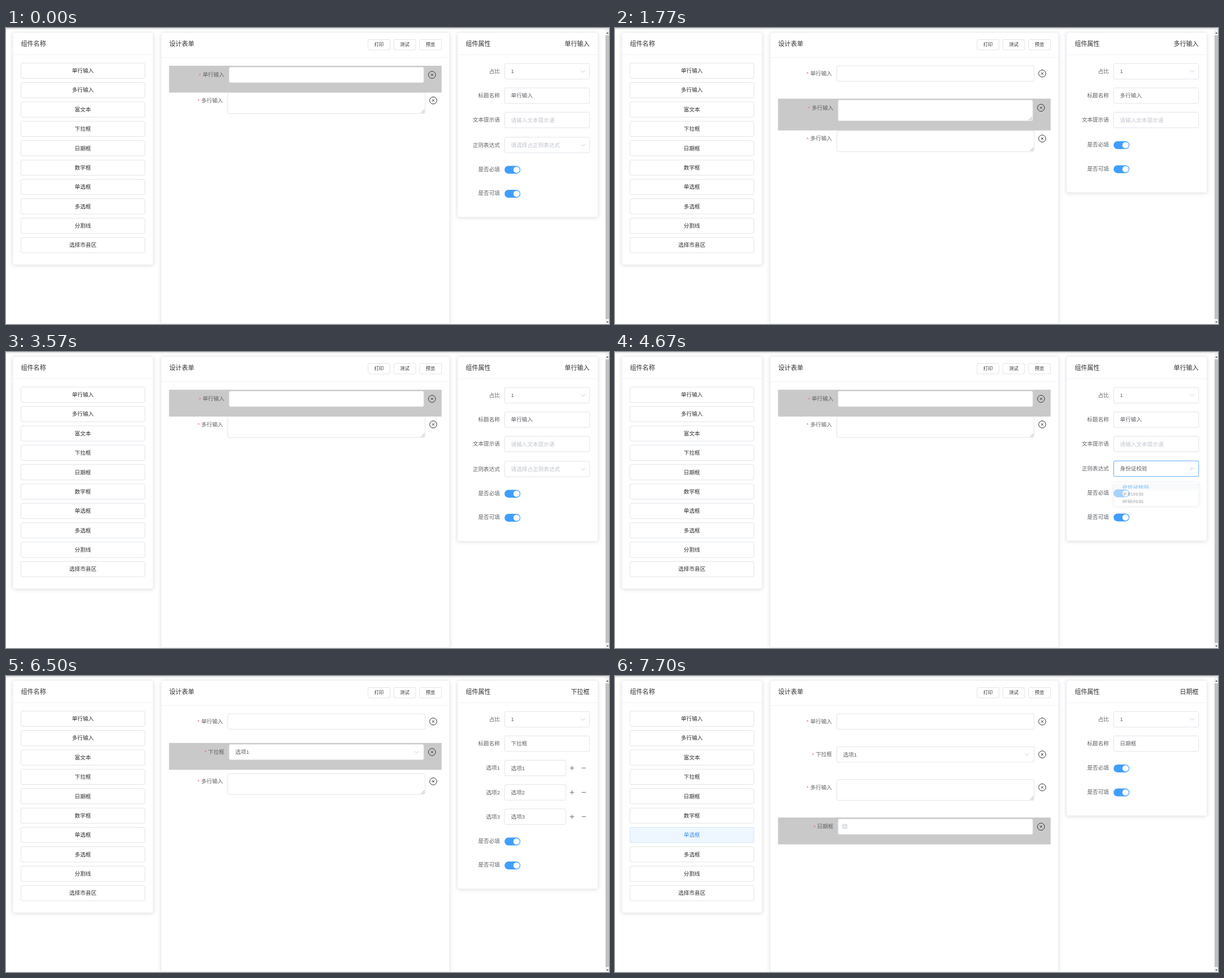
Animation, 1067 px wide and 525 px high, one loop 8 s. Source, as an HTML page:

```html
<!DOCTYPE html>
<html>
<head>
<meta charset="utf-8">
<title>表单设计</title>
<style>
  html, body { margin: 0; width: 100%; height: 100%; overflow: hidden; background: #fff; }
  svg { display: block; width: 1067px; height: 525px; }
  text { font-family: "Liberation Sans", "Noto Sans CJK SC", "Noto Sans CJK", sans-serif; white-space: pre; }
  .card { filter: drop-shadow(0 1.4px 3.6px rgba(0, 0, 0, .13)); }
</style>
</head>
<body>
<svg id="stage" viewBox="0 0 1067 525"></svg>
<script>
const LOOP = 8000;
const INK = '#303133', TEXT = '#606266', HINT = '#c0c4cc', LINE = '#dcdfe6', BLUE = '#409eff';
const SIZE = 9.65;
const stage = document.getElementById('stage');

const clamp = v => Math.max(0, Math.min(1, v));
const rgb = hex => [1, 3, 5].map(i => parseInt(hex.slice(i, i + 2), 16));
const mix = (a, b, p) => {
  const to = rgb(b);
  return `rgb(${rgb(a).map((v, i) => Math.round(v + (to[i] - v) * p))})`;
};

// cubic-bezier(x1, y1, x2, y2) solved by bisection
function bezier(x1, y1, x2, y2, x) {
  const at = (a, b, s) => 3 * (1 - s) * (1 - s) * s * a + 3 * (1 - s) * s * s * b + s * s * s;
  let lo = 0, hi = 1;
  for (let i = 0; i < 24; i++) {
    const mid = (lo + hi) / 2;
    if (at(x1, x2, mid) < x) lo = mid; else hi = mid;
  }
  return at(y1, y2, lo);
}
const zoom = p => bezier(.23, 1, .32, 1, clamp(p));
const ease = p => bezier(.25, .1, .25, 1, clamp(p));

const rect = (x, y, w, h, fill, stroke = 'none', r = 2.6, extra = '') =>
  `<rect x="${x}" y="${y}" width="${w}" height="${h}" rx="${r}" fill="${fill}" stroke="${stroke}" stroke-width=".85" ${extra}/>`;
const label = (s, x, cy, fill = TEXT, anchor = 'start', size = SIZE, extra = '') =>
  `<text x="${x}" y="${cy + size * .365}" font-size="${size}" fill="${fill}" text-anchor="${anchor}" ${extra}>${s}</text>`;
const path = (d, stroke, w = .8, extra = '') =>
  `<path d="${d}" fill="none" stroke="${stroke}" stroke-width="${w}" ${extra}/>`;
const caret = (x, y, turn = 0) =>
  path(`M${x - 3.5} ${y - 1.7}l3.5 3.5l3.5 -3.5`, HINT, .9, `transform="rotate(${turn} ${x} ${y})"`);
const card = (x, y, w, h, headY) =>
  rect(x, y, w, h, '#fff', '#ebeef5', 2.8, 'class="card"') + path(`M${x} ${headY}h${w}`, '#ebeef5');

// ---- palette on the left ----
const PARTS = ['单行输入', '多行输入', '富文本', '下拉框', '日期框', '数字框', '单选框', '多选框', '分割线', '选择市县区'];
// [button, from, to]
const HOVERS = [[1, 1030, 1570], [3, 5130, 5200], [2, 5200, 5600], [3, 5600, 6450], [4, 6830, 7000], [6, 7630, LOOP]];

function palette(t) {
  let out = card(12, 8, 248.3, 412, 47.5) + label('组件名称', 26.5, 28, INK, 'start', 11.05);
  PARTS.forEach((name, i) => {
    const hover = HOVERS.find(([k, a, b]) => k === i && t >= a && t < b);
    const p = hover ? .7 + .3 * clamp((t - hover[1]) / 100) : 0;
    const y = 62.2 + 34.37 * i;
    out += rect(26.4, y, 219.4, 27.2, mix('#ffffff', '#ecf5ff', p), mix(LINE, '#c6e2ff', p));
    out += label(name, 136, y + 13.3, mix(INK, BLUE, p), 'middle');
  });
  return out;
}

// ---- form in the middle ----
const SCENES = [
  { at: 0, rows: ['单行输入', '多行输入'], sel: 0 },
  { at: 1570, rows: ['单行输入', '多行输入', '多行输入'], sel: 1, slide: true },
  { at: 2830, rows: ['单行输入', '多行输入'], sel: 1 },
  { at: 3570, rows: ['单行输入', '多行输入'], sel: 0 },
  { at: 6450, rows: ['单行输入', '下拉框', '多行输入'], sel: 1, slide: true },
  { at: 7000, rows: ['单行输入', '下拉框', '多行输入', '日期框'], sel: 3, slide: true }
];
const FIELD_HOVERS = [[600, 800], [2170, 2670]];

function formRow(name, y, on, hot) {
  const area = name === '多行输入';
  const h = area ? 37 : 27.6, inset = on ? 2.4 : 0;
  const x = 392.4 + inset, right = 741.6 - inset, top = y + inset, cy = top + 13.8;
  const end = 384 + inset;
  let out = on ? rect(288.5, y, 482.3, area ? 56.4 : 47.6, '#c9c9c9', 'none', 0) : '';
  out += label(name, end, cy - .3, TEXT, 'end');
  out += label('*', end - name.length * SIZE - 2.8, cy, '#f56c6c', 'end');
  out += rect(x, top, right - x, h, '#fff', hot ? HINT : LINE);
  if (area) {
    const b = top + h - 1;
    out += path(`M${right - 7} ${b}l6 -6M${right - 3.8} ${b}l2.8 -2.8`, '#777', .7);
  }
  if (name === '下拉框') out += label('选项1', x + 11, cy) + caret(right - 12.5, cy);
  if (name === '日期框') {
    const l = x + 8, c = top + 9.8;
    out += rect(l, c, 7.6, 7.2, 'none', HINT, .5);
    out += path(`M${l} ${c + 2.2}h7.6M${l + 2} ${c - .8}v1.6M${l + 5.6} ${c - .8}v1.6M${l + 1.5} ${c + 4}h4.6M${l + 1.5} ${c + 5.6}h4.6`, HINT, .7);
  }
  const ix = 756 - inset * .9;
  out += `<circle cx="${ix}" cy="${cy}" r="6.3" fill="none" stroke="${INK}" stroke-width="1"/>`;
  return out + path(`M${ix - 2} ${cy - 2}l4 4m0 -4l-4 4`, INK, 1);
}

function form(t, scene) {
  let out = card(274.8, 8, 510, 516.4, 52.4) + label('设计表单', 288.8, 28, INK, 'start', 11.05);
  ['打印', '测试', '预览'].forEach((s, i) => {
    const x = 640.7 + 45.5 * i;
    out += rect(x, 20.4, 38.8, 18.6, '#fff', LINE, 2) + label(s, x + 19.4, 29.4, INK, 'middle', 8.3);
  });
  const hot = FIELD_HOVERS.some(([a, b]) => t >= a && t < b);
  let y = 66.9;
  scene.rows.forEach((name, i) => {
    const on = i === scene.sel, area = name === '多行输入';
    const lag = on && scene.slide ? 10 * (1 - clamp((t - scene.at) / 150)) : 0;
    out += formRow(name, y - lag, on, on && hot);
    y += on ? (area ? 57 : 47.8) : (area ? 67.3 : 58.4);
  });
  return out;
}

// ---- properties on the right ----
const OPEN = 4100, CLOSE = 4636, FADE = 300;
const PANELS = {
  '单行输入': [['文本提示语', '请输入文本提示语', 'hint'], ['正则表达式', '请选择占正则表达式', 'rule']],
  '多行输入': [['文本提示语', '请输入文本提示语', 'hint']],
  '下拉框': ['选项1', '选项2', '选项3'].map(s => [s, s, 'option']),
  '日期框': []
};

function dropdown(t) {
  if (t < OPEN || t > CLOSE + FADE) return '';
  const p = t < CLOSE ? zoom((t - OPEN) / FADE) : 1 - zoom((t - CLOSE) / FADE);
  const chosen = t >= 4600;
  let out = rect(882.4, 0, 150.4, 79, '#fff', '#e4e7ed', 2.6, 'class="card"');
  if (t >= 4430) out += rect(882.8, 4, 149.6, 23.5, '#f5f7fa', 'none', 0);
  ['身份证校验', '手机校验', '邮箱校验'].forEach((s, i) => {
    const on = chosen && i === 0;
    out += label(s, 897.2, 15.8 + 23.5 * i, on ? BLUE : TEXT, 'start', SIZE, on ? 'font-weight="700"' : '');
  });
  return `<g transform="translate(0 230.5) scale(1 ${p})" opacity="${p}">${out}</g>`;
}

function props(t, name) {
  const picking = name === '单行输入' && t >= OPEN;
  const picked = picking && t >= CLOSE;
  const fields = [['占比', '1', 'select'], ['标题名称', name, 'text'], ...PANELS[name]];
  const shift = name === '单行输入' ? (picked ? .5 : 1.1) : name === '多行输入' ? .7 : 0;
  const first = 77.5 + 43.2 * fields.length + shift;
  let out = card(799, 8, 248.3, first + 42.6 + 41.5 - 8, 47.5);
  out += label('组件属性', 813.4, 28, INK, 'start', 11.05) + label(name, 1032.6, 28, INK, 'end', 11.05);

  fields.forEach(([title, value, kind], i) => {
    const cy = 76.8 + 43.2 * i + (kind === 'rule' ? shift : 0);
    const rule = kind === 'rule', option = kind === 'option';
    const faint = kind === 'hint' || (rule && !picked);
    out += label(title, 874, cy - .3, TEXT, 'end');
    out += rect(882.4, cy - 13.8, option ? 108.4 : 150.4, 27.6, '#fff', rule && picking ? BLUE : LINE);
    out += label(rule && picked ? '身份证校验' : value, 893.6, cy - .2, faint ? HINT : TEXT);
    if (kind === 'select') out += caret(1021, cy);
    if (rule) {
      const turn = !picking ? 0 : picked ? 1 - ease((t - CLOSE) / FADE) : ease((t - OPEN) / FADE);
      out += caret(1021, cy, 180 * turn);
    }
    if (option) out += path(`M997.7 ${cy}h7.6m-3.8 -3.8v7.6M1018.7 ${cy}h7.6`, TEXT, .9);
  });

  ['是否必填', '是否可填'].forEach((s, i) => {
    const cy = first + 42.6 * i;
    out += label(s, 874, cy - 1.2, TEXT, 'end');
    out += rect(882.2, cy - 7, 28, 14, BLUE, 'none', 7);
    out += `<circle cx="903.4" cy="${cy}" r="5.6" fill="#fff"/>`;
  });
  return out + (picking ? dropdown(t) : '');
}

const FRAME = rect(0, .6, 1067, 1.2, '#d2d2d2', 'none', 0)
  + rect(1060.4, 2, 6.6, 523, '#f1f1f1', 'none', 0)
  + rect(1061, 13, 6, 503, '#c1c1c1', 'none', 0)
  + '<path d="M1062 10l2.2 -2.6l2.2 2.6zM1062 520.5l2.2 2.6l2.2 -2.6z" fill="#505050"/>';

let shown = '';
function draw() {
  const t = performance.now() % LOOP;
  const scene = SCENES.filter(s => s.at <= t).pop();
  const picture = palette(t) + form(t, scene) + props(t, scene.rows[scene.sel]) + FRAME;
  if (picture !== shown) stage.innerHTML = shown = picture;
  requestAnimationFrame(draw);
}
draw();
</script>
</body>
</html>
```
